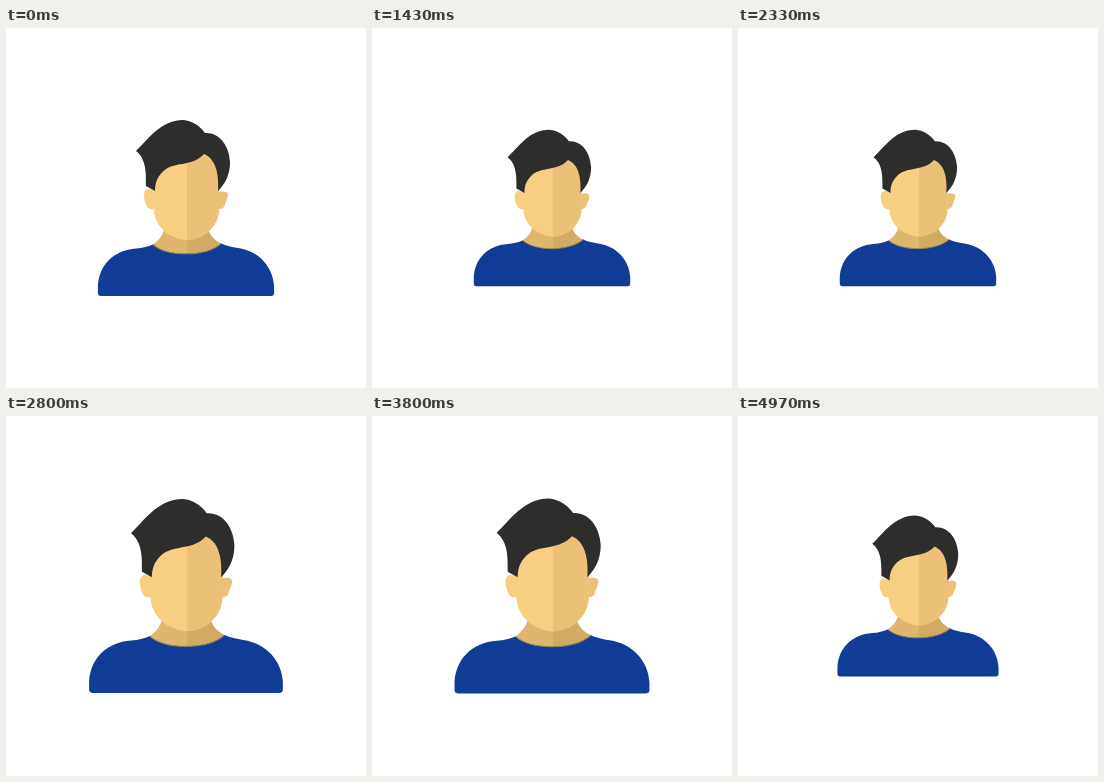
Animation, 360 px wide and 360 px high, one loop 5010 ms. Source, as an HTML page:

```html
<!DOCTYPE html>
<html lang="en">
<head>
<meta charset="utf-8">
<title>Pulsing avatar</title>
<style>
  html, body { margin: 0; width: 100%; height: 100%; overflow: hidden; background: #fff; }
  svg { display: block; width: 100vw; height: 100vh; }
</style>
</head>
<body>
<svg viewBox="0 0 360 360">
  <defs>
    <clipPath id="rightHalf"><rect x="181" y="90" width="100" height="180"/></clipPath>
    <path id="neck" d="M158 196V202C156 209 151 214 146 217C157 231 204 231 216 216C209 213 204 208 202 201V196Z"/>
    <path id="face" d="M148 158C150 136 165 125 181 123H201C211 130 213 145 213 162V183C212 199 197 212 180 212C164 211 149 199 148 183Z"/>
  </defs>
  <g id="avatar">
    <use href="#neck" fill="#e0b66f"/>
    <use href="#neck" fill="#d3aa64" clip-path="url(#rightHalf)"/>
    <path fill="#103c95" d="M92 265V258C93 237 108 222 130 220.500C137 220 142 218.500 147 216.500C161 229 200 229 215 215.500C220 218 226 219 232 220C253 223 267 239 268 258V265Q268 268 265 268H95Q92 268 92 265Z"/>
    <path fill="none" stroke="#8c8655" stroke-width="1" d="M147 216.500C161 229 200 229 215 215.500"/>
    <path fill="#f8ce82" d="M149 163C143 159 138 161 138 167C138 172 140 177 142 180Q145 182 149 181Z"/>
    <path fill="#edc077" d="M212 164C217 163 222 163 222 167C221 172 219 176 218 179Q215 182 211 181Z"/>
    <use href="#face" fill="#f8ce82"/>
    <use href="#face" fill="#edc077" clip-path="url(#rightHalf)"/>
    <path fill="#2d2d2c" d="M130 123C141 113 154 92 177 92C187 93 194 98 199 105C213 104 223 117 224 134C224 147 219 156 212 163C213 146 210 131 198 126C187 138 171 134 160 141C152 147 149 154 149 163L140 158C140 148 141 131 130 123Z"/>
  </g>
</svg>
<script>
  const LOOP = 5010, FRAME = 100 / 3, LAST = 149;
  const CYCLE = 27, RISE = 11.7, PEAK_START = 15, PEAK_END = 16, FALL = 14.3;
  const MAX_SIZE = 100, DROP = 23.3, DRAWN_SIZE = 88;
  const avatar = document.getElementById("avatar");
  const startTime = performance.now();

  // Half-width of the figure: a quick swell, a brief peak, a slower fall.
  function sizeAt(frame) {
    let phase = (frame + 11) % CYCLE;
    if (phase < PEAK_START - RISE) phase += CYCLE;
    const away = phase < PEAK_START ? (PEAK_START - phase) / RISE
               : phase > PEAK_END ? (phase - PEAK_END) / FALL : 0;
    return MAX_SIZE - DROP * Math.sin(Math.PI / 2 * Math.min(1, away));
  }

  function draw(time) {
    const frame = Math.min(LAST, Math.floor((time + 3.4) / FRAME));
    const scale = sizeAt(frame) / DRAWN_SIZE;
    avatar.setAttribute("transform", `translate(180 180) scale(${scale}) translate(-180 -180)`);
  }

  function tick() {
    draw((performance.now() - startTime) % LOOP);
    requestAnimationFrame(tick);
  }
  tick();
</script>
</body>
</html>
```
